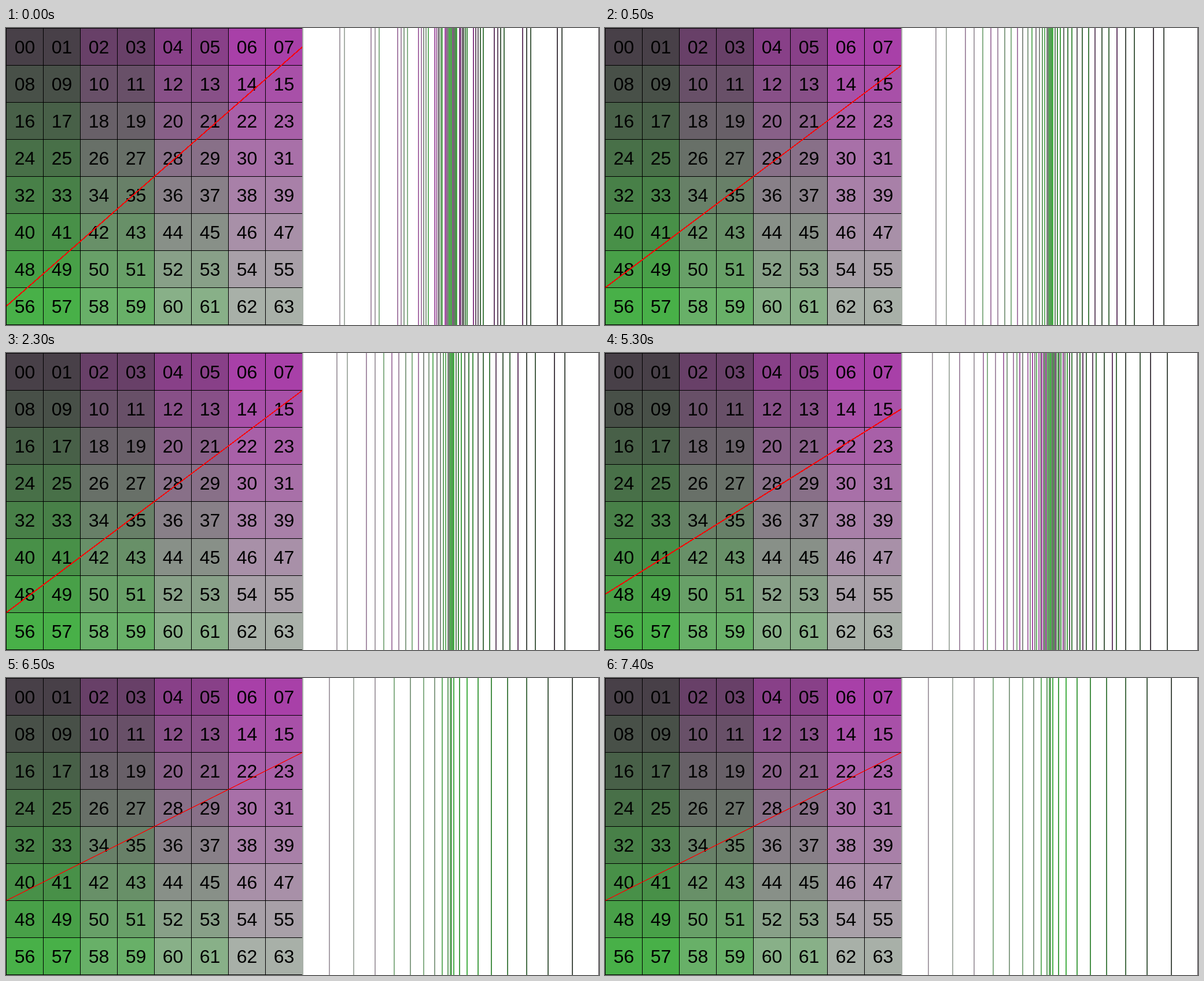
An HTML page for the animation above (8000 ms loop, 1025x513 px).

```html
<!DOCTYPE html>
<html lang="en">
<head>
<meta charset="utf-8">
<title>Grid projection</title>
<style>
html, body { margin: 0; width: 100%; height: 100%; overflow: hidden; background: #fff; }
svg { display: block; }
text { font: 32px "Liberation Sans", Arial, sans-serif; text-anchor: middle; }
</style>
</head>
<body>
<svg id="stage" width="1025" height="513" viewBox="0 0 1025 513"></svg>
<script>
const stage = document.getElementById('stage');
const LOOP = 8000, N = 8, CELL = 64, HALF = 256;
const MID = HALF + 0.5;   // centre of the grid
const AXIS = 769;         // centre of the projection panel

// Slope of the red line is rise / 8.
const steps = [
  { start: 0, rise: 7, weight: 2 },
  { start: 500, rise: 6, weight: 2 },
  { start: 3500, rise: 5, weight: 2 },
  { start: 6500, rise: 4, weight: 1.2 }
];

function add(tag, attrs, text) {
  const el = document.createElementNS('http://www.w3.org/2000/svg', tag);
  set(el, attrs);
  if (text) el.textContent = text;
  return stage.appendChild(el);
}

function set(el, attrs) {
  for (const key in attrs) el.setAttribute(key, attrs[key]);
}

const rect = (x, y, width, height, fill) =>
  add('rect', { x, y, width, height, fill, 'shape-rendering': 'crispEdges' });

const cells = Array.from({ length: N * N }, (_, i) => {
  const col = i % N, row = Math.floor(i / N);
  const rb = 72 + 32 * Math.floor(col / 2), g = 64 + 16 * row;
  return { col, row, u: 2 * col - 7, v: 2 * row - 7, fill: `rgb(${rb},${g},${rb})` };
});

rect(0, 0, 1025, 513, '#fff');
for (const c of cells) rect(c.col * CELL, c.row * CELL, CELL, CELL, c.fill);
cells.forEach((c, i) => add('text',
  { x: c.col * CELL + 32.5, y: c.row * CELL + 44 }, String(i).padStart(2, '0')));
for (let i = 0; i <= N; i++) {
  rect(i * CELL, 0, 1, 513, '#000');
  rect(0, i * CELL, 513, 1, '#000');
}

const redLine = add('line', { stroke: '#f00', 'shape-rendering': 'crispEdges' });
const bars = cells.map(c => rect(0, 0, 2, 513, c.fill));

function show({ rise, weight }) {
  const slope = rise / 8;
  const yAt = x => MID - (x - MID) * slope;
  set(redLine, { x1: 1, y1: yAt(1), x2: 513, y2: yAt(513), 'stroke-width': weight });

  // Each cell's signed distance, squared, spreads over the panel.
  cells.forEach((c, i) => {
    const d = (c.u + c.v * slope) / (7 * (1 + slope));
    bars[i].setAttribute('x', Math.round(AXIS - HALF * d * Math.abs(d)) - 1);
  });
}

const began = performance.now();
let current;

function tick() {
  const t = (performance.now() - began) % LOOP;
  const step = steps.filter(s => s.start <= t).pop();
  if (step !== current) show(current = step);
  requestAnimationFrame(tick);
}
tick();
</script>
</body>
</html>
```
